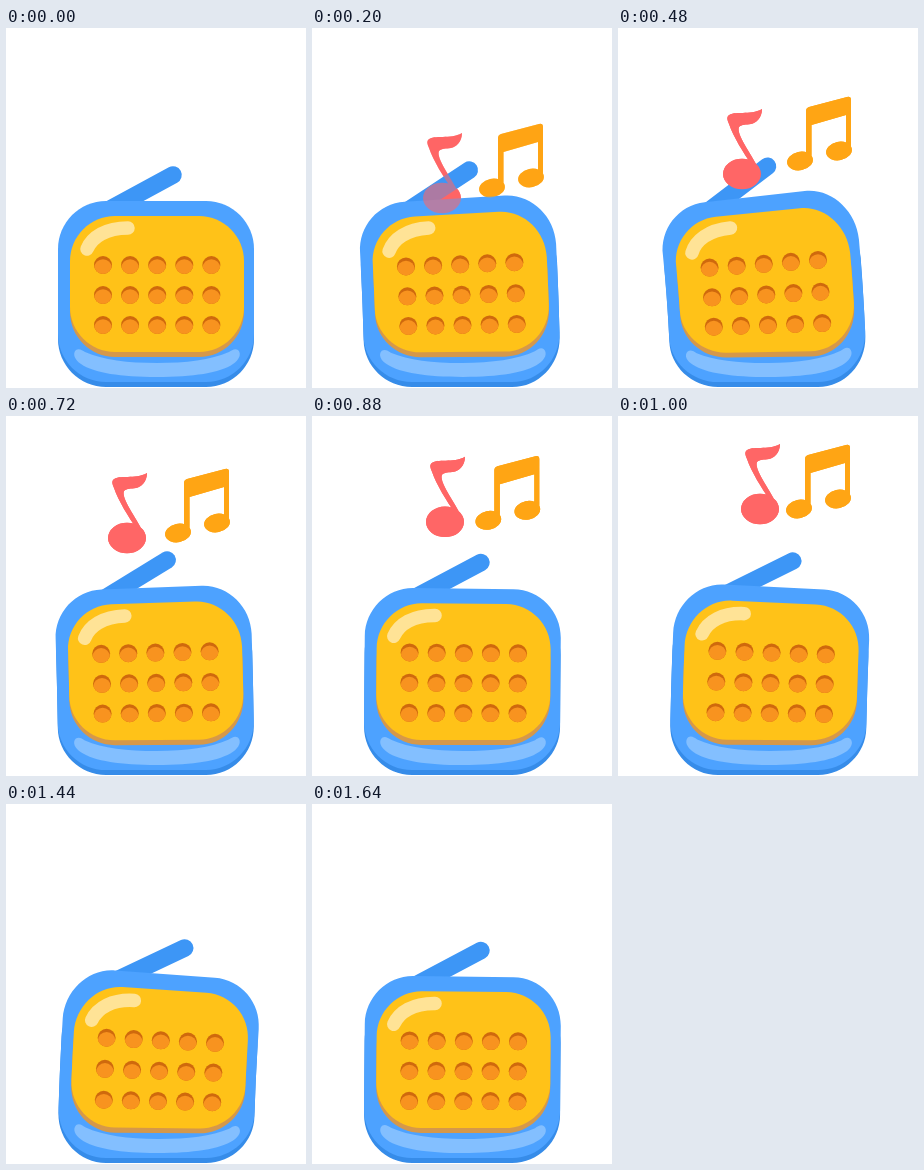
Write an HTML page with a canvas that moves like this. It is 300x360 px and loops after 1680 ms.

```html
<!DOCTYPE html>
<html lang="en">
<head>
<meta charset="utf-8">
<title>Dancing radio</title>
<style>
html, body { margin: 0; height: 100%; overflow: hidden; background: #fff; }
canvas { display: block; }
</style>
</head>
<body>
<canvas width="300" height="360"></canvas>
<script>
const ctx = document.querySelector('canvas').getContext('2d');
const LOOP = 1680, STEP = 40;
let lean = 0;

// Bends a point sideways, more the higher it stands above the base.
function bend(x, y) {
  const h = Math.max(0, 350 - y), k = h / 201;
  return [
    x + 20 * lean * k * k,
    y + lean * (x - 150) * 0.00073 * h - 7.5 * Math.abs(lean) * k ** 3
  ];
}

const bent = d => new Path2D(d.replace(/(-?[\d.]+) (-?[\d.]+)/g,
  (_, x, y) => bend(+x, +y).map(v => v.toFixed(2)).join(' ')));

function fill(d, color) {
  ctx.fillStyle = color;
  ctx.fill(bent(d));
}

function stroke(d, color, width) {
  ctx.strokeStyle = color;
  ctx.lineWidth = width;
  ctx.lineCap = 'round';
  ctx.stroke(bent(d));
}

function roundBox(l, t, r, b, rad) {
  const c = rad * 0.45, a = t + rad, z = b - rad;
  const m = a + (z - a) / 3, n = a + (z - a) * 2 / 3;
  return `M${l} ${a}C${l} ${t + c} ${l + c} ${t} ${l + rad} ${t}L${r - rad} ${t}` +
    `C${r - c} ${t} ${r} ${t + c} ${r} ${a}C${r} ${m} ${r} ${n} ${r} ${z}` +
    `C${r} ${b - c} ${r - c} ${b} ${r - rad} ${b}L${l + rad} ${b}` +
    `C${l + c} ${b} ${l} ${b - c} ${l} ${z}C${l} ${n} ${l} ${m} ${l} ${a}Z`;
}

function disc(x, y, r, color) {
  ctx.fillStyle = color;
  ctx.beginPath();
  ctx.arc(x, y, r, 0, 7);
  ctx.fill();
}

function hole(x, y) {
  const [cx, cy] = bend(x, y);
  ctx.save();
  disc(cx, cy, 9, '#cf690d');
  ctx.clip();
  disc(cx, cy + 3, 8.8, '#f8931f');
  ctx.restore();
}

function drawRadio() {
  stroke('M97 185L167 147', '#3d96f6', 17.5);
  fill(roundBox(52, 190, 248, 359, 48), '#368ce9');
  fill(roundBox(52, 173, 248, 354, 48), '#4da2ff');
  fill('M70 322C66 326 69 332 75 336C88 345 115 349 151 349C187 349 214 345 227 336' +
    'C233 332 236 326 232 322C229 320 226 322 223 324C205 332 180 335 151 335' +
    'C122 335 97 332 79 324C76 322 73 320 70 322Z', '#83bfff');
  fill(roundBox(64, 200, 238, 329, 45), '#d5984a');
  fill(roundBox(64, 188, 238, 324, 45), '#ffc218');
  stroke('M81 221C86 209 100 200 122 200', '#ffe396', 13.5);
  for (let row = 0; row < 3; row++)
    for (let col = 0; col < 5; col++) hole(97 + 27.1 * col, 237 + 30 * row);
}

const ellipse = (path, x, y, rx, ry, tilt) => {
  const e = new Path2D();
  e.ellipse(x, y, rx, ry, tilt, 0, 2 * Math.PI);
  path.addPath(e);
  return path;
};

const single = ellipse(new Path2D('M-14-58C-8-64 8-58 20-65C20-56 14-51 9-50C4-49 0-50-3-47' +
  'C-6-40 8-22 18-3L10-9C2-20-9-38-13-50C-15-55-15-56-14-58Z'), 0, 0, 19, 15.3, 0);
const pair = new Path2D('M6 0V-50Q6-53 9-54L47-64Q51-65 51-61V-10H46V-46L11.5-36V0Z');
ellipse(pair, 0, 0, 13, 9.3, -0.2);
ellipse(pair, 39, -10, 13, 9.3, -0.2);

// Each key: time, x, y of the (left) note head.
const notes = [
  { shape: single, color: '#ff6666',
    keys: [[0, 134, 186], [200, 130, 170], [480, 124, 146], [720, 121, 122], [1000, 142, 93], [1300, 147, 57]] },
  { shape: pair, color: '#ffa514',
    keys: [[0, 173, 178], [200, 180, 160], [480, 182, 133], [720, 172, 117], [1000, 181, 93], [1300, 188, 56]] }
];

// Smooth curve through the keys.
function along(keys, t, axis) {
  const last = keys.length - 1;
  const slope = i => {
    const a = keys[Math.max(0, i - 1)], b = keys[Math.min(last, i + 1)];
    return (b[axis] - a[axis]) / (b[0] - a[0]);
  };
  let i = 0;
  while (i < last - 1 && t >= keys[i + 1][0]) i++;
  const p = keys[i], q = keys[i + 1], d = q[0] - p[0], s = (t - p[0]) / d, r = 1 - s;
  return r * r * (1 + 2 * s) * p[axis] + s * s * (1 + 2 * r) * q[axis] +
    s * r * d * (r * slope(i) - s * slope(i + 1));
}

function drawNotes(t, alpha) {
  ctx.globalAlpha = alpha;
  for (const { shape, color, keys } of notes) {
    ctx.save();
    ctx.translate(along(keys, t, 1), along(keys, t, 2));
    ctx.fillStyle = color;
    ctx.fill(shape);
    ctx.restore();
  }
  ctx.globalAlpha = 1;
}

function draw(t) {
  const p = t / LOOP;
  lean = p < 0.25 ? -4 * p : p < 0.75 ? 4 * p - 2 : 4 - 4 * p;
  ctx.fillStyle = '#fff';
  ctx.fillRect(0, 0, 300, 360);
  // Fading notes tint the radio but stay solid on the background.
  const alpha = Math.max(0, Math.min(1, t / 350, (1455 - t) / 350));
  const solid = alpha >= 0.5;
  if (solid) drawNotes(t, 1);
  drawRadio();
  if (t < 1280) {
    ctx.save();
    if (!solid) {
      ctx.clip(bent(roundBox(52, 173, 248, 354, 48)));
    }
    drawNotes(t, alpha);
    ctx.restore();
  }
}

const start = performance.now();
function tick() {
  const t = (performance.now() - start) % LOOP;
  draw(Math.floor(t / STEP) * STEP);
  requestAnimationFrame(tick);
}
tick();
</script>
</body>
</html>
```
